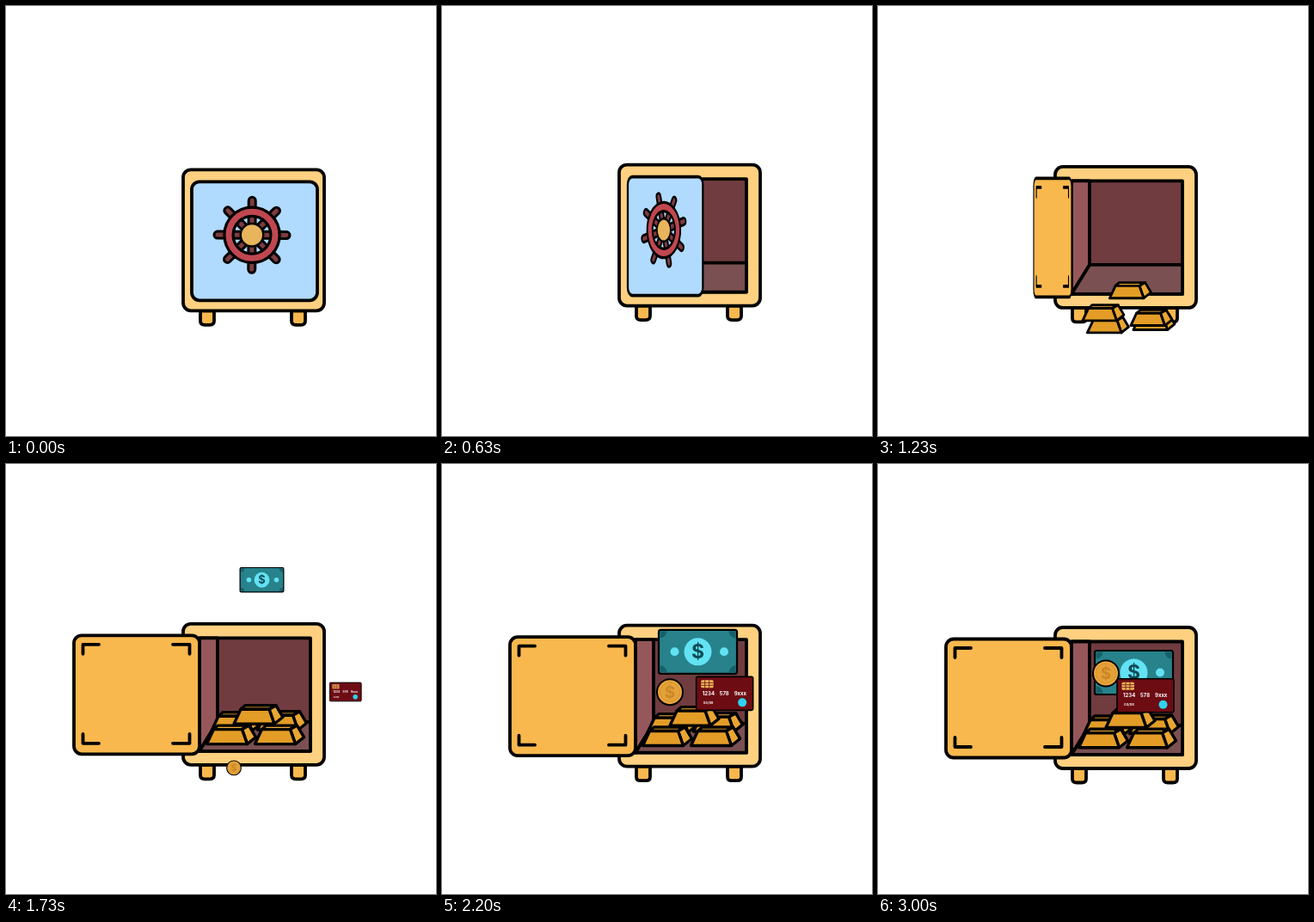
Recreate the animation shown at these times as an HTML page. Size 500 px wide and 500 px high, loop 3030 ms.

```html
<!DOCTYPE html>
<html lang="en">
<head>
<meta charset="utf-8">
<title>Safe</title>
<style>
  html, body { margin: 0; width: 100%; height: 100%; overflow: hidden; background: #fff; }
  svg { display: block; width: 100%; height: 100%; }
  .line { stroke: #000; stroke-width: 3.8; stroke-linejoin: round; stroke-linecap: round; }
  #bar { stroke-width: 3.4; }
  text { font-family: Inter, "Open Sans", sans-serif; font-weight: 700; }
</style>
</head>
<body>
<svg viewBox="0 0 500 500">
  <defs>
    <g id="bar" class="line">
      <path fill="#f0ad35" d="M-20-7L-15-11.500L21-11.500L13-7Z"/>
      <path fill="#e9a632" d="M13-7L21-11.500L29 2L19 10Z"/>
      <path fill="#e39d27" d="M-28 10L19 10L13-7L-20-7Z"/>
    </g>
  </defs>

  <g id="scene">
    <g class="line" fill="#f8b84e">
      <path id="foot" d="M226 354V366Q226 370.500 231 370.500H237Q242 370.500 242 366V354Z"/>
      <use href="#foot" x="106"/>
    </g>
    <rect class="line" x="206" y="190" width="164" height="164" rx="9" fill="#ffd080"/>

    <g class="line">
      <rect x="225" y="206.500" width="129" height="131.500" fill="#703c40"/>
      <path fill="#96575b" d="M225 206.500H246V304L225 338Z"/>
      <path fill="#7a5052" d="M246 304H354V338H225Z"/>
    </g>

    <g id="front">
      <rect class="line" x="0" y="204" width="146" height="138" rx="9" fill="#b1daff"/>
      <g transform="translate(70 266)"><g id="wheel">
        <g id="spokesDark" stroke="#000" stroke-width="11" stroke-linecap="round"></g>
        <g id="spokesBrown" stroke="#7d3c40" stroke-width="5" stroke-linecap="round"></g>
        <circle r="27" fill="none" stroke="#000" stroke-width="13.500"/>
        <circle r="27" fill="none" stroke="#c04750" stroke-width="7"/>
        <circle r="14.500"/>
        <circle r="12" fill="#e8b45c"/>
      </g></g>
    </g>

    <g id="back">
      <rect class="line" x="-146" y="203.500" width="146" height="138" rx="9" fill="#f8b84e"/>
      <path class="line" fill="none" d="M-135.500 225V214H-117M-31 214H-11.500V225M-135.500 318V329H-117M-31 329H-11.500V318"/>
    </g>

    <g id="bars"></g>

    <g id="note">
      <rect x="-45.500" y="-25.500" width="91" height="51" rx="2.500" fill="#27828b" stroke="#000" stroke-width="2.200"/>
      <g fill="#17616a">
        <path d="M-44-24H-36A8 8 0 0 1-44-16Z"/>
        <path d="M44-24H36A8 8 0 0 0 44-16Z"/>
        <path d="M-44 24H-36A8 8 0 0 0-44 16Z"/>
        <path d="M44 24H36A8 8 0 0 1 44 16Z"/>
      </g>
      <g fill="#62e2f3">
        <circle r="16"/><circle cx="-27" r="5"/><circle cx="30.500" r="5"/>
      </g>
      <text y="8" font-size="23" text-anchor="middle" fill="#0e4d56">$</text>
    </g>

    <g id="coin">
      <circle r="15" fill="#eaa73d" stroke="#000" stroke-width="2"/>
      <circle r="11.500" fill="#e5a037" stroke="#d6942f" stroke-width="1"/>
      <text y="7" font-size="19" text-anchor="middle" fill="#c98728">$</text>
    </g>

    <g id="card">
      <rect x="-33" y="-19.500" width="66" height="39" rx="2" fill="#6d0c13" stroke="#000" stroke-width="1.600"/>
      <rect x="-27.500" y="-15.500" width="14.500" height="9" rx="1.500" fill="#efb65a"/>
      <path d="M-27.500-12.500H-13M-27.500-9.500H-13M-23-15.500V-6.500M-18-15.500V-6.500" stroke="#6d0c13" stroke-width=".8"/>
      <g fill="#fff" font-size="6">
        <text x="-26" y="2">1234</text><text x="-6" y="2">578</text><text x="11" y="2">9xxx</text>
        <text x="-25" y="12.300" font-size="4">03/9x</text>
      </g>
      <circle cx="20.500" cy="10.500" r="5" fill="#2fd3ee"/>
    </g>
  </g>
</svg>
<script>
  const LOOP = 3030, BOB = 1010;
  const el = id => document.getElementById(id);
  const clamp = x => Math.min(1, Math.max(0, x));
  const easeOut = p => 1 - (1 - p) ** 2;
  const make = (name, attrs, parent) => {
    const node = document.createElementNS("http://www.w3.org/2000/svg", name);
    for (const key in attrs) node.setAttribute(key, attrs[key]);
    return parent.appendChild(node);
  };
  const place = (node, value) => node.setAttribute("transform", value);

  for (const id of ["spokesDark", "spokesBrown"])
    for (let a = 0; a < 360; a += 45)
      make("line", { y1: -12, y2: -40, transform: `rotate(${a})` }, el(id));

  // Items fly from (x + dx, y + dy) to (x, y) while growing.
  const barTiming = { start: 1050, move: 580, grow: 300 };
  const itemTiming = { start: 1530, move: 1070, grow: 600 };
  const bars = [
    [267, 304.5, 148], [320.5, 303.5, 143],
    [261.5, 319.8, 86], [317.5, 319.8, 98],
    [293, 296.5, 80]
  ].map(([x, y, dy]) => ({
    node: make("use", { href: "#bar" }, el("bars")), x, y, dx: 0, dy, ...barTiming
  }));
  const items = [
    { node: el("note"), x: 297.5, y: 242.5, dx: 0, dy: -157 },
    { node: el("coin"), x: 265, y: 243.5, dx: 0, dy: 173 },
    { node: el("card"), x: 311, y: 269.2, dx: 127, dy: 0 }
  ].map(item => ({ ...item, ...itemTiming }));
  const flyers = [...bars, ...items];

  // Height of the whole scene: one rise and fall per BOB.
  function bobShift(t) {
    const phase = (t % BOB) / BOB;
    const p = 1 - Math.abs(1 - 2 * phase);
    const wave = (1 - Math.cos(Math.PI * p)) / 2;
    return 0.3 - 6.5 * (0.6 * wave + 0.4 * easeOut(p));
  }

  function showDoor(t) {
    const turn = 2 * clamp((t - 363) / 1334);
    const closed = turn < 1;
    el("front").style.display = closed ? "" : "none";
    el("back").style.display = closed ? "none" : "";
    place(el("front"), `translate(216 0) scale(${1 - turn} 1)`);
    place(el("back"), `translate(225 0) scale(${turn - 1} 1)`);
    place(el("wheel"), `rotate(${t / 3})`);
  }

  function showFlyer(f, t) {
    const age = t - f.start;
    f.node.style.display = age > 0 ? "" : "none";
    const rest = 1 - easeOut(clamp(age / f.move));
    const size = easeOut(clamp(age / f.grow));
    place(f.node, `translate(${f.x + f.dx * rest} ${f.y + f.dy * rest}) scale(${size})`);
  }

  function draw(t) {
    place(el("scene"), `translate(0 ${bobShift(t)})`);
    showDoor(t);
    flyers.forEach(f => showFlyer(f, t));
  }

  const begin = performance.now();
  function tick() {
    draw((performance.now() - begin) % LOOP);
    requestAnimationFrame(tick);
  }
  draw(0);
  requestAnimationFrame(tick);
</script>
</body>
</html>
```
